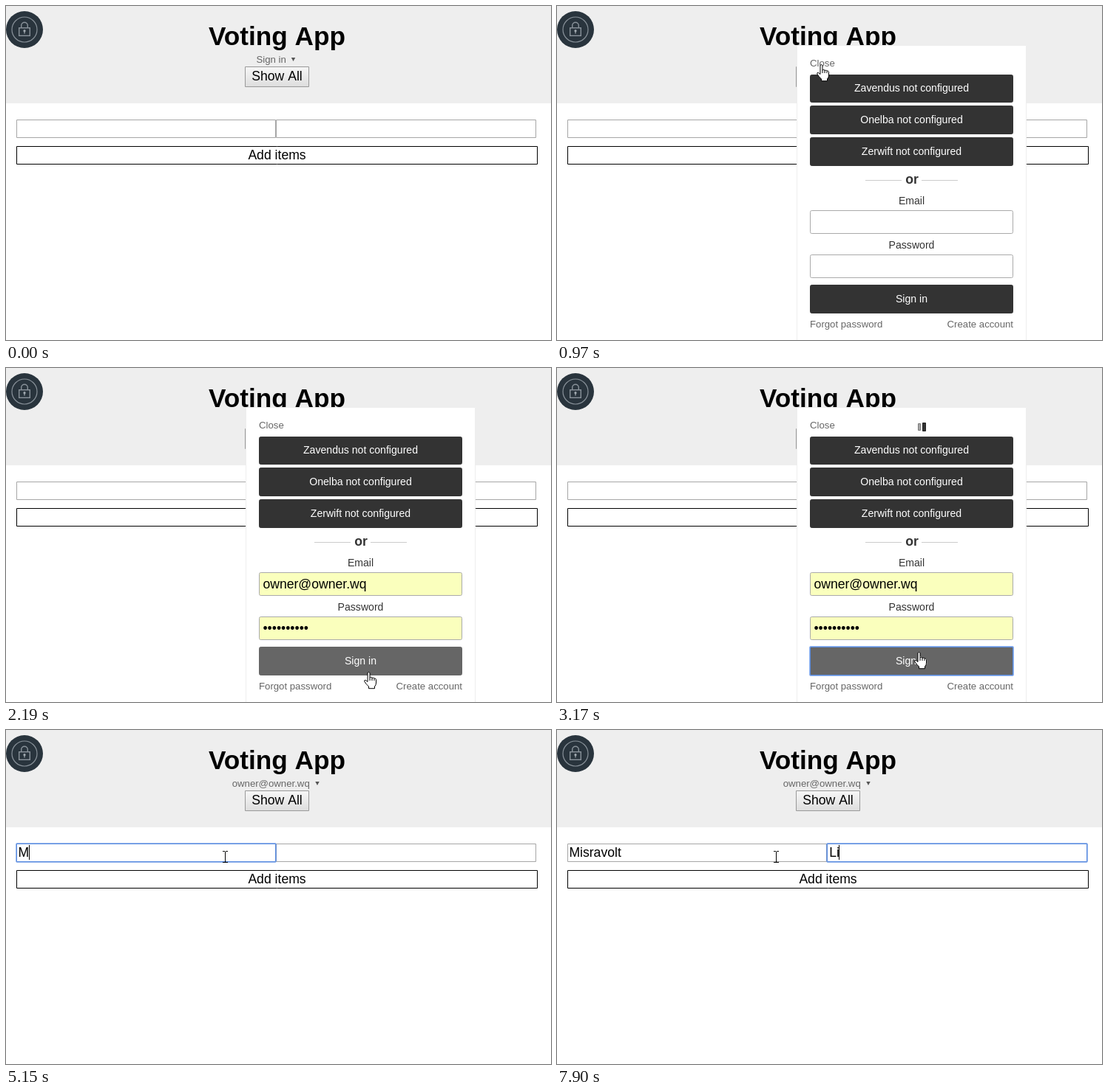
An HTML page with a canvas that plays this animation: 737x453 px, repeating every 8 s.

```html
<!DOCTYPE html>
<html lang="en">
<head>
<meta charset="utf-8">
<title>Voting App</title>
<style>
  html, body { margin: 0; width: 737px; height: 453px; overflow: hidden; background: #fff; }
  canvas { display: block; }
</style>
</head>
<body>
<canvas id="stage" width="737" height="453"></canvas>
<script>
const ctx = document.getElementById('stage').getContext('2d');
const LOOP = 8000;
const BASE = 17.6;
const USER = 'owner@owner.wq';
const PROVIDERS = ['Zavendus', 'Onelba', 'Zerwift'];
const MODAL_X = 479.5;

// Moments of the story, in ms
const OPEN = 970, FILL = 1300, HOVER = 2190, PRESS = 2610, LOAD = 2730, LOGIN = 3290;
const FOCUS_A = 4170, FOCUS_B = 7030, BLINK = 530;

// Pointer stops: time, x, y, shape
const pointer = [
  [0, 0, 0, ''],
  [120, 510, 271, 'arrow'], [220, 480, 214, 'arrow'], [330, 439, 138, 'arrow'],
  [440, 400, 72, 'arrow'], [550, 372, 42, 'arrow'], [640, 360, 62, 'arrow'], [750, 356, 79, 'hand'],
  [1300, 361, 88, 'hand'], [1410, 384, 132, 'hand'], [1520, 417, 192, 'hand'],
  [1630, 449, 250, 'arrow'], [1740, 471, 293, 'beam'], [1840, 480, 313, 'arrow'],
  [2060, 485, 357, 'beam'], [2190, 489, 412, 'hand'], [2390, 489, 398, 'hand'], [2500, 488, 385, 'hand'],
  [3290, 488, 385, 'arrow'], [3610, 470, 361, 'arrow'], [3720, 415, 299, 'arrow'],
  [3830, 352, 231, 'arrow'], [3940, 310, 186, 'arrow'], [4050, 296, 172, 'beam']
];

// Time of each keystroke
const fieldA = { x: 16.4, word: 'Misravolt', keys: [5150, 5260, 5370, 5590, 5710, 5930, 6040, 6150, 6580] };
const fieldB = { x: 368.3, word: 'Li', keys: [7680, 7900] };

const arrow = new Path2D('M.5 .5V16.5L4.2 13L6.7 18.5L9 17.5L6.6 12.2H11.7Z');
const hand = new Path2D('M0 1.5Q1.5-.5 3 1.5V8Q4.5 6.5 6 8V8.5Q7.5 7.5 9 9Q11 8.5 11.5 10.5V15' +
  'Q11.5 18 9.5 20V22.7H1.5V20Q-2-17 1.5 20Q-2 17-4.3 13Q-4.5 10.8-2.5 11.5L0 13.5Z'
    .replace('Q-2-17 1.5 20', ''));
const fingers = new Path2D('M3 8V12M6 8.5V12M9 9.5V12');

function rect(x, y, w, h, fill) {
  ctx.fillStyle = fill;
  ctx.fillRect(x, y, w, h);
}

// Box with a one-pixel border inside its edges
function box(x, y, w, h, fill, line, r = 0) {
  ctx.beginPath();
  ctx.roundRect(x + .5, y + .5, w - 1, h - 1, r);
  ctx.fillStyle = fill;
  ctx.fill();
  ctx.strokeStyle = line;
  ctx.lineWidth = 1;
  ctx.stroke();
}

function text(s, x, y, size = BASE, color = '#000', align = 'left', weight = '') {
  ctx.font = `${weight} ${size}px "Liberation Sans", Arial, sans-serif`;
  ctx.textAlign = align;
  ctx.fillStyle = color;
  ctx.fillText(s, x, y);
}

function ring(x, y, w, h) {
  box(x - 1, y - 1, w + 2, h + 2, 'transparent', 'rgba(91,141,225,.65)', 1.5);
  box(x, y, w, h, 'transparent', '#5b8de1');
}

function badge() {
  ctx.fillStyle = '#29343d';
  ctx.beginPath();
  ctx.arc(25, 32, 25, 0, 7);
  ctx.fill();
  ctx.strokeStyle = '#89929a';
  ctx.lineWidth = 1.2;
  ctx.beginPath();
  ctx.arc(25, 32, 17, 0, 7);
  ctx.stroke();
  ctx.lineWidth = 1.4;
  ctx.strokeRect(17.7, 29.7, 14.6, 10.6);
  ctx.beginPath();
  ctx.moveTo(20.7, 29);
  ctx.lineTo(20.7, 26.5);
  ctx.arc(25, 26.5, 4.3, Math.PI, 0);
  ctx.lineTo(29.3, 29);
  ctx.stroke();
  ctx.fillStyle = '#a3abb1';
  ctx.beginPath();
  ctx.arc(25, 33.7, 1.6, 0, 7);
  ctx.fill();
  ctx.fillRect(24.4, 34, 1.2, 3.5);
}

function header(t) {
  rect(0, 0, 737, 132, '#eee');
  badge();
  text('Voting App', 366.5, 53, 35.2, '#000', 'center', 'bold');
  const signed = t >= LOGIN;
  text(signed ? USER : 'Sign in', signed ? 305.7 : 338.5, 77, 13.2, '#666');
  const x = signed ? 421 : 388.5;
  ctx.fillStyle = '#555';
  ctx.beginPath();
  ctx.moveTo(x - 2.7, 70);
  ctx.lineTo(x + 2.7, 70);
  ctx.lineTo(x, 75);
  ctx.fill();
  const shade = ctx.createLinearGradient(0, 82, 0, 110);
  shade.addColorStop(0, '#f7f7f7');
  shade.addColorStop(1, '#ddd');
  box(323, 82, 87, 28, shade, '#999');
  text('Show All', 366.5, 101, BASE, '#000', 'center');
}

function typed(field, t, start, end) {
  const n = field.keys.filter(k => k <= t).length;
  const s = field.word.slice(0, n);
  text(s, field.x, 172);
  if (t < start || t >= end) return;
  const last = n ? field.keys[n - 1] : start;
  if (Math.floor((t - last) / BLINK) % 2 === 0) {
    rect(Math.floor(field.x + ctx.measureText(s).width), 156, 1, 20, '#000');
  }
}

function form(t) {
  box(14, 154, 351, 25, '#fff', '#a6a6a6');
  box(365, 154, 352, 25, '#fff', '#a6a6a6');
  if (t >= FOCUS_B) ring(365, 154, 352, 25);
  else if (t >= FOCUS_A) ring(14, 154, 351, 25);
  typed(fieldA, t, FOCUS_A, FOCUS_B);
  typed(fieldB, t, FOCUS_B, LOOP);
  box(14, 190, 705, 25, '#fff', '#000');
  text('Add items', 366.5, 208, BASE, '#000', 'center');
}

function button(label, y, h, fill = '#333') {
  box(342, y, 275, h, fill, fill, 2);
  text(label, MODAL_X, y + (h > 38 ? 24 : 23), 14.08, '#fff', 'center');
}

function input(label, y, value) {
  text(label, MODAL_X, y - 8, 14.08, '#333', 'center');
  box(342, y, 275, 32, value ? '#faffbd' : '#fff', '#aaa', 2);
  text(value, 347.4, y + 22);
}

function loader(t) {
  const step = Math.floor((t - LOAD) / 110);
  const bar = (x, size) => {
    const h = [0, 8, 10, 12][size];
    box(x, 80 - h / 2, size > 2 ? 5 : 4, h, ['', '#ccc', '#aaa', '#333'][size], size > 2 ? '#222' : '#777');
  };
  if (step < 2) bar(488, 1);
  else if (step < 3) bar(488, 3);
  else {
    bar(488, 2);
    bar(494, 3);
  }
}

function modal(t) {
  box(324, 53, 311, 420, '#fff', '#eee');
  text('Close', 342, 82, 13.2, '#666');
  PROVIDERS.forEach((name, i) => button(name + ' not configured', 93 + i * 42.5 - (i % 2) * .5, i ? 39 : 38));
  rect(417, 236, 49, 1, '#ccc');
  rect(493, 236, 49, 1, '#ccc');
  text('or', MODAL_X + .5, 241, BASE, '#333', 'center', 'bold');
  const full = t >= FILL;
  input('Email', 277, full ? USER : '');
  input('Password', 337, full ? '•'.repeat(10) : '');
  button('Sign in', 378, 39, t >= HOVER ? '#666' : '#333');
  if (t >= PRESS) ring(342, 378, 275, 39);
  text('Forgot password', 342, 436, 13.2, '#666');
  text('Create account', 617, 436, 13.2, '#666', 'right');
  if (t >= LOAD) loader(t);
}

function cursor(t) {
  const [, x, y, shape] = pointer.findLast(p => p[0] <= t);
  ctx.save();
  ctx.translate(x, y);
  ctx.fillStyle = '#fff';
  ctx.strokeStyle = '#000';
  ctx.lineWidth = 1;
  if (shape === 'arrow' || shape === 'hand') {
    const path = shape === 'arrow' ? arrow : hand;
    ctx.fill(path);
    ctx.stroke(path);
    if (shape === 'hand') ctx.stroke(fingers);
  } else if (shape === 'beam') {
    rect(0, -7, 1, 15, '#000');
    for (const top of [-8, 7]) {
      rect(-3, top, 3, 1, '#000');
      rect(1, top, 3, 1, '#000');
    }
  }
  ctx.restore();
}

function draw(t) {
  rect(0, 0, 737, 453, '#fff');
  header(t);
  form(t);
  if (t >= OPEN && t < LOGIN) modal(t);
  cursor(t);
}

const begin = performance.now();
function tick() {
  draw((performance.now() - begin) % LOOP);
  requestAnimationFrame(tick);
}
tick();
</script>
</body>
</html>
```
